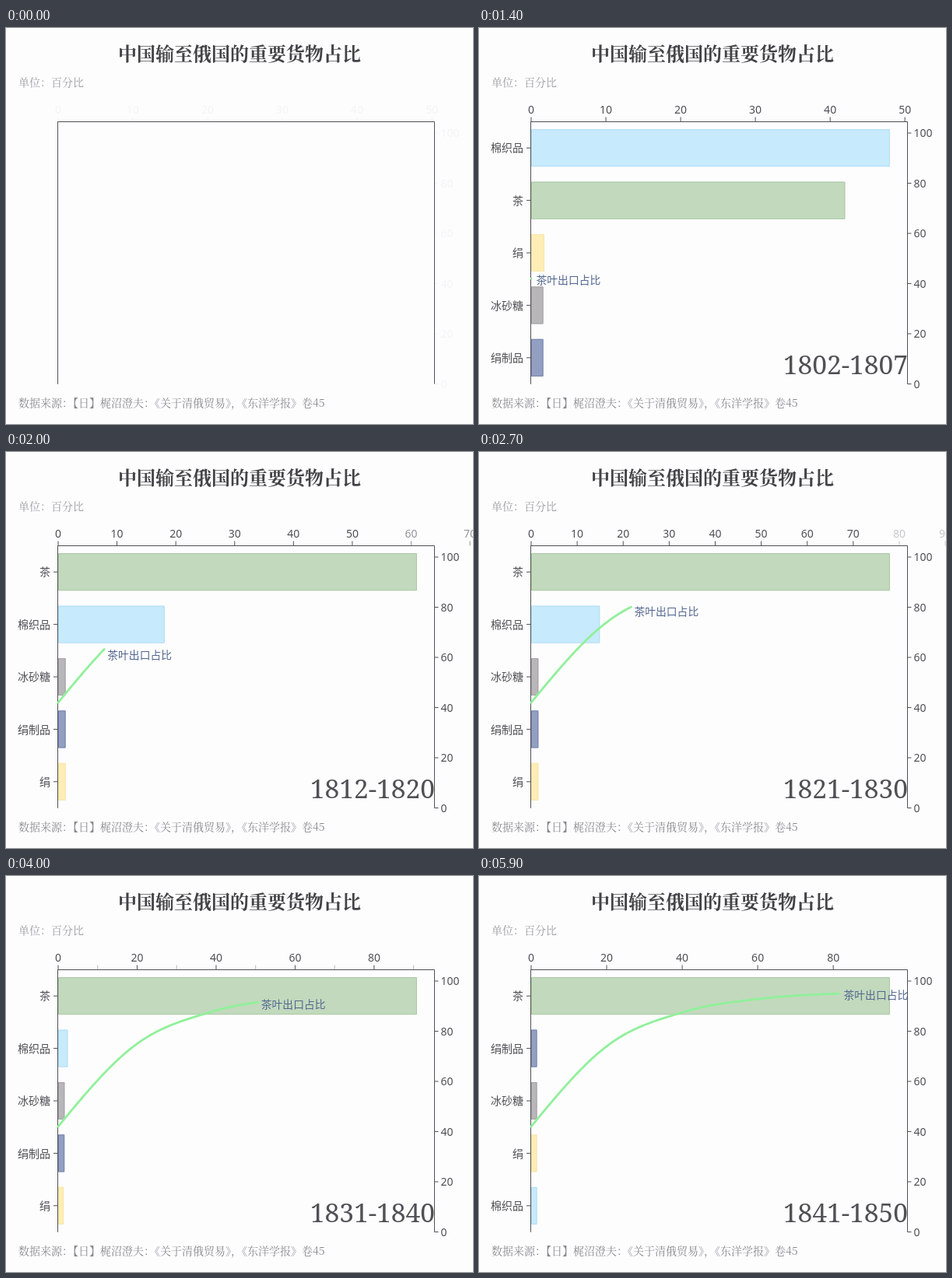
These frames come from a looping animation (600 by 509 pixels, 6 s). An HTML page with a canvas:

```html
<!DOCTYPE html>
<html lang="zh-CN">
<head>
<meta charset="utf-8">
<title>中国输至俄国的重要货物占比</title>
<style>
html, body { margin: 0; width: 100%; height: 100%; overflow: hidden; background: #fdfdfe; }
canvas { display: block; }
</style>
</head>
<body>
<canvas id="stage" width="600" height="509"></canvas>
<script>
const ctx = document.getElementById('stage').getContext('2d');
const LOOP = 6000, START = 1400, STEP = 1000, MOVE = 600;
const LEFT = 66.5, RIGHT = 550.5, TOP = 120.5, BOTTOM = 457.5;
const W = RIGHT - LEFT, BAND = (BOTTOM - TOP) / 5, BAR = 48;
const INK = '#505055';
const SANS = '"Noto Sans", "Noto Sans CJK SC", sans-serif';
const SERIF = '"Noto Serif CJK SC", "Noto Serif", "Noto Sans CJK SC", serif';

const periods = ['1802-1807', '1812-1820', '1821-1830', '1831-1840', '1841-1850'];
const tea = [42, 74.4, 87.8, 93, 95];
const peak = [48, 74.4, 87.8, 93, 95];
const goods = [
  { name: '棉织品', fill: '#c7eafc', edge: '#b4def4', values: [48, 22.1, 7.54, 2.5, 1.55], rank: [0, 1, 1, 1, 4] },
  { name: '茶', fill: '#c2d9bd', edge: '#aac9a5', values: tea, rank: [1, 0, 0, 0, 0] },
  { name: '绢', fill: '#feedb5', edge: '#f7e5ab', values: [1.77, 1.58, 1.7, 1.45, 1.55], rank: [2, 4, 4, 4, 3] },
  { name: '冰砂糖', fill: '#b8b6b8', edge: '#a3a1a3', values: [1.62, 1.55, 1.72, 1.68, 1.55], rank: [3, 2, 2, 2, 2] },
  { name: '绢制品', fill: '#939fc0', edge: '#7484ad', values: [1.62, 1.55, 1.72, 1.65, 1.55], rank: [4, 3, 3, 3, 1] }
];

const clamp = v => Math.max(0, Math.min(1, v));
const mix = (a, b, u) => a + (b - a) * u;
const limit = k => peak[k] * 1.05;
const span = (v, k) => W * v / limit(k);
const yOf = v => BOTTOM - (BOTTOM - TOP) * v / 104.5;

function text(str, x, y, size, font, color, align = 'left', weight = 400) {
  ctx.font = `${weight} ${size}px ${font}`;
  ctx.fillStyle = color;
  ctx.textAlign = align;
  ctx.fillText(str, x, y);
}

function line(x1, y1, x2, y2) {
  ctx.beginPath();
  ctx.moveTo(x1, y1);
  ctx.lineTo(x2, y2);
  ctx.stroke();
}

function faded(alpha, draw) {
  ctx.save();
  ctx.globalAlpha *= alpha;
  draw();
  ctx.restore();
}

// Monotone cubic through the tea shares
const rise = tea.slice(1).map((v, i) => v - tea[i]);
const slopes = tea.map((_, i) => {
  const inner = j => Math.min(rise[j - 1], rise[j], (rise[j - 1] + rise[j]) / 4) * 2;
  if (i === 0) return (3 * rise[0] - inner(1)) / 2;
  if (i === 4) return (3 * rise[3] - inner(3)) / 2;
  return inner(i);
});

function curve(p) {
  const i = Math.min(3, Math.floor(p)), u = p - i, r = 1 - u;
  return tea[i] + rise[i] * u * u * (3 - 2 * u) + slopes[i] * u * r * r - slopes[i + 1] * u * u * r;
}

function linear(p) {
  const i = Math.min(3, Math.floor(p));
  return tea[i] + rise[i] * (p - i);
}

const trackX = p => LEFT + 0.5 + 98.75 * p;

function ticks(k) {
  const step = limit(k) > 94.5 ? 20 : 10, list = [];
  for (let v = 0; v <= limit(k); v += step) list.push(v);
  return list;
}

function drawAxes(t, from, to, u) {
  ctx.strokeStyle = INK;
  ctx.lineWidth = 1;
  ctx.strokeRect(LEFT, TOP, 0, BOTTOM - TOP);
  line(LEFT, TOP, RIGHT, TOP);
  line(RIGHT, TOP, RIGHT, BOTTOM);

  const before = ticks(from), after = ticks(to);
  const xAt = v => LEFT + 0.5 + mix(span(v, from), span(v, to), u);
  faded(clamp((t + 50) / 1000), () => {
    for (const v of after) {
      faded(before.includes(v) ? 1 : u, () => {
        line(xAt(v), TOP, xAt(v), TOP - 6);
        text(v, xAt(v), 109.5, 14, SANS, INK, 'center');
      });
    }
    for (const v of before) {
      if (!after.includes(v)) faded(1 - u, () => line(xAt(v), TOP, xAt(v), TOP - 6));
    }
    for (let v = 0; v <= 100; v += 20) {
      const y = yOf(v);
      line(RIGHT, y, RIGHT + 5, y);
      text(v, 558.5, y + 5.3, 14, SANS, INK);
    }
  });
}

function drawBars(t, from, to, m) {
  const enter = clamp(t / MOVE);
  for (const g of goods) {
    const y = TOP + BAND * (mix(g.rank[from], g.rank[to], m) + 0.5);
    const w = mix(span(g.values[from], from), span(g.values[to], to), m) * enter;
    if (w > 1) {
      ctx.fillStyle = g.fill;
      ctx.fillRect(LEFT + 0.5, y - BAR / 2, w, BAR);
      ctx.strokeStyle = g.edge;
      ctx.lineWidth = 1;
      ctx.strokeRect(LEFT + 1, y - BAR / 2 + 0.5, w - 1, BAR - 1);
    }
    faded(enter, () => {
      ctx.strokeStyle = INK;
      line(LEFT - 5.5, y, LEFT, y);
      text(g.name, 57, y + 5.2, 14, SANS, INK, 'right');
    });
  }
}

function drawTrack(t) {
  const p = Math.max(0, Math.min(4, (t - START) / STEP));
  ctx.beginPath();
  ctx.moveTo(trackX(0), yOf(tea[0]));
  for (let q = 0; q < p; q += 0.02) ctx.lineTo(trackX(q), yOf(curve(q)));
  ctx.lineTo(trackX(p) + 0.01, yOf(curve(p)));
  ctx.strokeStyle = '#90f09a';
  ctx.lineWidth = 2.8;
  ctx.lineCap = ctx.lineJoin = 'round';
  ctx.stroke();
  ctx.lineCap = 'butt';

  // The caption trails the tip slightly
  const c = Math.max(0, Math.min(4, p < 4 ? p - 0.025 : p));
  const y = yOf((curve(c) + linear(c)) / 2) + 1;
  text('茶叶出口占比', trackX(c) + 6.5, y + 5.5, 13.8, SANS, '#53678f');
}

function draw(t) {
  ctx.fillStyle = '#fdfdfe';
  ctx.fillRect(0, 0, 600, 509);
  text('中国输至俄国的重要货物占比', 300, 41.6, 24, SERIF, '#434347', 'center', 700);
  text('单位：百分比', 16, 75.2, 14, SERIF, '#98989c');
  text('数据来源：【日】梶沼澄夫：《关于清俄贸易》，《东洋学报》卷45', 16, 487.2, 14, SERIF, '#88888c');

  const phase = (t - START) / STEP;
  const from = Math.max(0, Math.min(3, Math.floor(phase)));
  const u = clamp(phase - from), m = clamp(u * STEP / MOVE);
  drawBars(t, from, from + 1, m);
  drawAxes(t, from, from + 1, u);
  if (t >= 100) {
    drawTrack(t);
    const k = u > 0 ? from + 1 : from;
    text(periods[k], 551, 444.5, 33.5, '"Noto Serif", serif', INK, 'right');
  }
}

const origin = performance.now();
function tick() {
  const t = (performance.now() - origin) % LOOP;
  draw(Math.floor(t / 100) * 100);
  requestAnimationFrame(tick);
}
tick();
</script>
</body>
</html>
```
